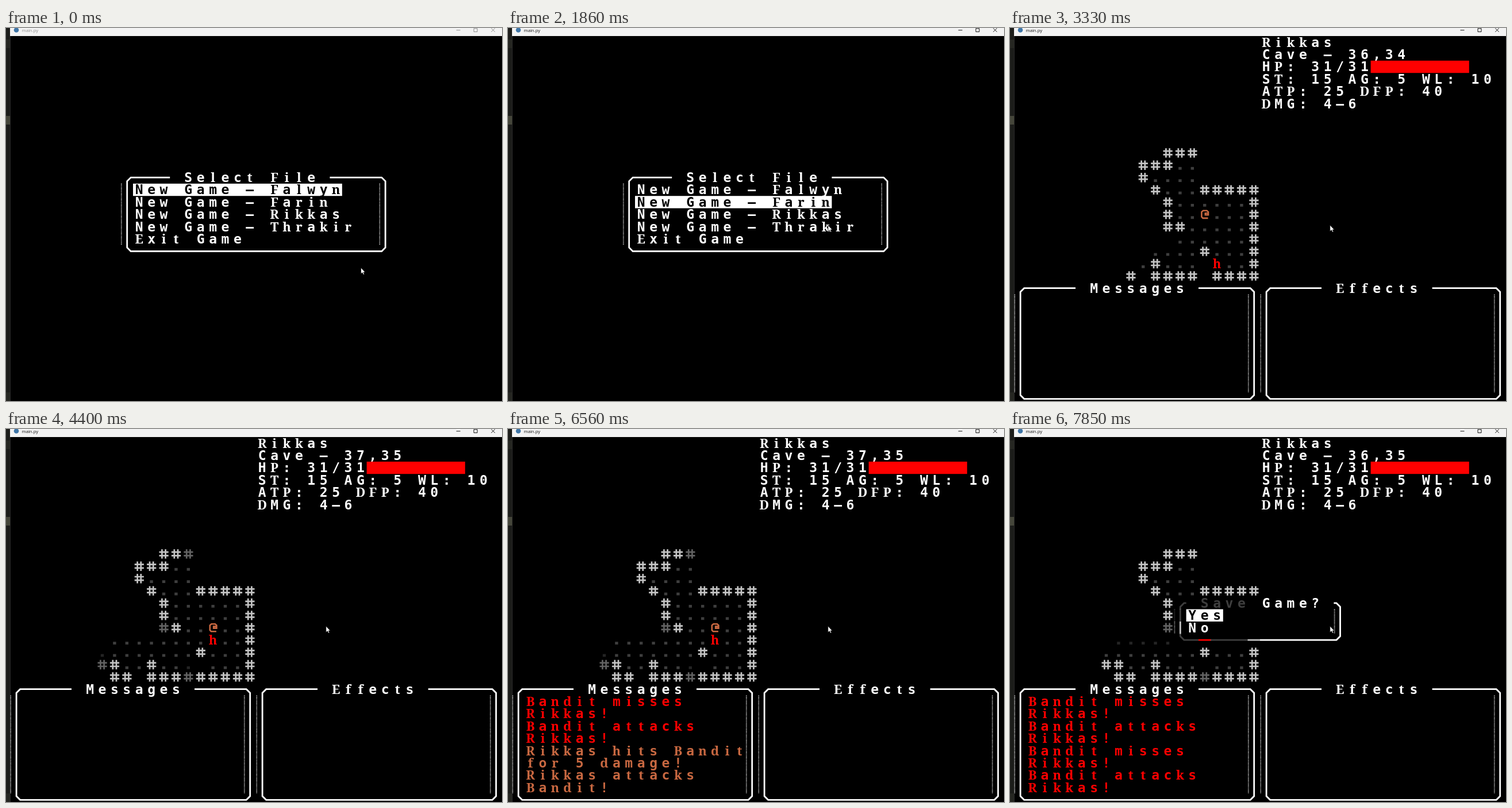
Recreate the animation shown at these times as an HTML page. Size 863x649 px, loop 8000 ms.

```html
<!DOCTYPE html>
<html lang="en">
<head>
<meta charset="utf-8">
<title>main.py</title>
<style>
  html, body { margin: 0; width: 100%; height: 100%; overflow: hidden; background: #000; }
  svg { display: block; width: 100%; height: 100%; }
  text { white-space: pre; }
  .cell { font: bold 23px "DejaVu Sans Mono", monospace; text-anchor: middle; }
  .slab { font: bold 22px "Noto Serif", serif; }
  .bar { font: 7.7px "Open Sans", sans-serif; }
  .tint { mix-blend-mode: multiply; }
</style>
</head>
<body>
<svg id="stage" viewBox="0 0 863 649" preserveAspectRatio="none"></svg>
<script>
const LOOP = 8000, CELL = 21.4;
const WHITE = '#fff', RED = '#f00', ORANGE = '#c86841', WALL = '#c4c4c4', DIM_WALL = '#626262',
      FLOOR = '#3e3e3e', DIM_FLOOR = '#242424';
const stage = document.getElementById('stage');

const n = v => +v.toFixed(2);
const X = col => n(7 + col * CELL);
const Y = row => n(14 + row * CELL);

const rect = (x, y, w, h, fill, extra = '') =>
  `<rect x="${x}" y="${y}" width="${n(w)}" height="${n(h)}" fill="${fill}" ${extra}/>`;
const stroke = (d, color, width, extra = '') =>
  `<path d="${d}" fill="none" stroke="${color}" stroke-width="${width}" ${extra}/>`;
const block = (col, row, w, h, fill, extra) => rect(X(col), Y(row), w * CELL, h * CELL, fill, extra);

// Text on the character grid, one glyph centred in each cell
function print(col, row, str, fill = WHITE) {
  const glyphs = [...str].map((ch, i) => {
    const slab = /[BDEFPRTbdfhiklnrt]/.test(ch) ? ' class="slab"' : '';
    return `<tspan x="${X(col + i + .5)}"${slab}>${ch}</tspan>`;
  });
  return `<text class="cell" y="${n(Y(row) + 18.6)}" fill="${fill}">${glyphs.join('')}</text>`;
}

function choice(col, row, str, active) {
  return (active ? block(col, row, str.length, 1, WHITE) : '') +
    print(col, row, str, active ? '#000' : WHITE);
}

// Frame through the cell centres, with a gap for the title and a stippled line at each side
function box(col, row, w, h, title, titleCol) {
  const l = X(col + .5) + .4, r = X(col + w - .5) + .4;
  const t = Y(row + .5), b = Y(row + h - .5), c = 6.5;
  const gapL = X(titleCol - 1), gapR = X(titleCol + title.length + 1);
  const frame = `M${gapL} ${t}H${l + c}L${l} ${t + c}V${b - c}L${l + c} ${b}H${r - c}L${r} ${b - c}V${t + c}L${r - c} ${t}H${gapR}`;
  const side = c => `M${X(c) + 1.2} ${Y(row + 1)}V${Y(row + h - 1)}`;
  return stroke(frame, WHITE, 2.8) +
    stroke(side(col) + side(col + w - 1), '#d0d0d0', 1.8, 'stroke-dasharray="1.34"') +
    print(titleCol, row, title);
}

function desktop(active) {
  const ink = active ? '#111' : '#8c8c8c';
  return rect(0, 0, 863, 649, '#000') +
    rect(0, 0, 7, 649, '#1c1d1a') + rect(0, 20, 7, 15, '#262722') +
    rect(0, 153, 7, 15, '#45463a') + rect(0, 634, 7, 15, '#262722') +
    rect(7, 0, .8, 649, '#333') +
    rect(7, 0, 856, 14, '#f3f3f3') +
    '<circle cx="18" cy="3.5" r="4.3" fill="#3f76a8"/>' +
    `<text class="bar" x="27.5" y="6.7" fill="${ink}">main.py</text>` +
    stroke('M783.5 3.8h7M814 .8h6v5.8h-6zM844.3 .4l6.4 6.4m0-6.4l-6.4 6.4', ink, 1);
}

const HEROES = ['Falwyn', 'Farin', 'Rikkas', 'Thrakir'];
function menu(selected) {
  const items = [...HEROES.map(h => 'New Game – ' + h), 'Exit Game'];
  return box(9, 11, 22, 7, 'Select File', 14) +
    items.map((s, i) => choice(10, 12 + i, s, i === selected)).join('');
}

// # wall, % remembered wall, . floor, : remembered floor
const MAP_COL = 7, MAP_ROW = 9;
const cave = (top, ...rest) => [top, '   ###..', '   #....', '    #...#####',
  '     #......#', '     #......#', ...rest];
const NICHE = '     %#.....#';
const MAPS = {
  start: cave('     ###', '     ##.....#', '      ......#', '    ....#...#',
    '   .#... ...#', '  # #### ####'),
  south: cave('     ###', NICHE, '      :.....#', '........#...#',
    '##..#... ...#', ' ## #### ####'),
  east: cave('     ##%', NICHE, ' ...........#', ':.......#...#',
    '%#..#..: ...#', ' ## ###%#####'),
  back: cave('     ###', NICHE, ' ::::::.....#', '........#...#',
    '##..#... ...#', ' ## ####%####')
};

function tile(ch, col, row) {
  const x = X(col), y = Y(row);
  if (ch === '#' || ch === '%')
    return stroke(`M${x + 7.6} ${y + 2.6}v16.4M${x + 13.8} ${y + 2.6}v16.4M${x + 2.7} ${y + 7.6}h16.2M${x + 2.7} ${y + 13.8}h16.2`,
      ch === '#' ? WALL : DIM_WALL, 2.7);
  if (ch === '.' || ch === ':')
    return rect(n(x + 8), n(y + 13.8), 5.4, 4.8, ch === '.' ? FLOOR : DIM_FLOOR);
  return '';
}

function hero(col, row) {
  const x = X(col), y = Y(row);
  return stroke(`M${x + 16.5} ${y + 17.3}H${x + 7.5}L${x + 5.4} ${y + 15}V${y + 6.5}L${x + 8} ${y + 4.2}H${x + 14.5}L${x + 17} ${y + 6.5}V${y + 11.6}H${x + 11.8}V${y + 8.6}H${x + 16}`,
    ORANGE, 2.6);
}

const says = (who, verb, whom) => [`${who} ${verb}`, whom + '!'];
const foe = [...says('Bandit', 'misses', 'Rikkas'), ...says('Bandit', 'attacks', 'Rikkas')];
const strike = says('Rikkas', 'attacks', 'Bandit');
const LOGS = {
  none: [],
  miss: [...foe, ...says('Rikkas', 'misses', 'Bandit'), ...strike],
  hit: [...foe, 'Rikkas hits Bandit', 'for 5 damage!', ...strike],
  foe: [...foe, ...foe]
};

function status(pos) {
  const lines = ['Rikkas', 'Cave – ' + pos, 'HP: 31/31', 'ST: 15 AG: 5 WL: 10',
    'ATP: 25 DFP: 40', 'DMG: 4–6'];
  return lines.map((s, i) => print(20, i, s)).join('') + block(29, 2, 8, 1, RED);
}

function saveDialog() {
  const tint = (col, row, w, fill) => block(col, row, w, 1, fill, 'class="tint"');
  return block(13, 13, 14, 4, '#000') + box(13, 13, 14, 4, 'Save Game?', 15) +
    tint(13, 13, 6, FLOOR) + tint(13, 14, 1, FLOOR) + tint(13, 15, 1, WALL) +
    tint(13, 16, 2, FLOOR) + tint(15, 16, 1, RED) + tint(16, 16, 3, FLOOR) + tint(19, 16, 1, WALL) +
    choice(14, 14, 'Yes', true) + choice(14, 15, 'No', false);
}

// The hero's world position sits 21 columns and 20 rows off the screen grid
function game({ map, at, bandit, log, asking }) {
  const [hc, hr] = [at[0] - 21, at[1] - 20], [bc, br] = bandit;
  let out = status(at.join(','));
  MAPS[map].forEach((line, j) => [...line].forEach((ch, i) => {
    const c = MAP_COL + i, r = MAP_ROW + j;
    if ((c !== hc || r !== hr) && (c !== bc || r !== br)) out += tile(ch, c, r);
  }));
  out += hero(hc, hr) + print(bc, br, 'h', RED);
  out += box(0, 20, 20, 10, 'Messages', 6) + box(20, 20, 20, 10, 'Effects', 26);
  LOGS[log].forEach((s, i) => {
    out += print(1, 21 + i, s, log === 'foe' || i < 4 ? RED : ORANGE);
  });
  return out + (asking ? saveDialog() : '');
}

const pointer = ([x, y]) =>
  `<path transform="translate(${x} ${y})" d="M.5 0V10.8L3 8.6L4.7 12.2L6.5 11.4L4.9 8H8Z" fill="#fff" stroke="#000" stroke-width=".7"/>`;

// Each step changes only what it names
const STEPS = [
  [0, { mouse: [617, 417], active: false, selected: 0 }],
  [150, { mouse: [567, 362] }],
  [310, { mouse: [559, 349] }],
  [460, { mouse: [556.3, 343] }],
  [760, { active: true }],
  [1860, { selected: 1 }],
  [2120, { selected: 2 }],
  [3330, { map: 'start', at: [36, 34], bandit: [16, 18], log: 'none' }],
  [4120, { map: 'south', at: [36, 35], bandit: [16, 17] }],
  [4400, { map: 'east', at: [37, 35], bandit: [16, 16] }],
  [5120, { log: 'miss' }],
  [6560, { log: 'hit' }],
  [7110, { map: 'back', at: [36, 35], bandit: [15, 16], log: 'foe' }],
  [7850, { asking: true }]
];

let shown = 0;
function render(t) {
  const passed = STEPS.filter(([start]) => start <= t);
  if (passed.length === shown) return;
  shown = passed.length;
  const s = Object.assign({}, ...passed.map(step => step[1]));
  stage.innerHTML = desktop(s.active) + (s.map ? game(s) : menu(s.selected)) + pointer(s.mouse);
}

const origin = performance.now();
function tick() {
  render((performance.now() - origin) % LOOP);
  requestAnimationFrame(tick);
}
tick();
</script>
</body>
</html>
```
